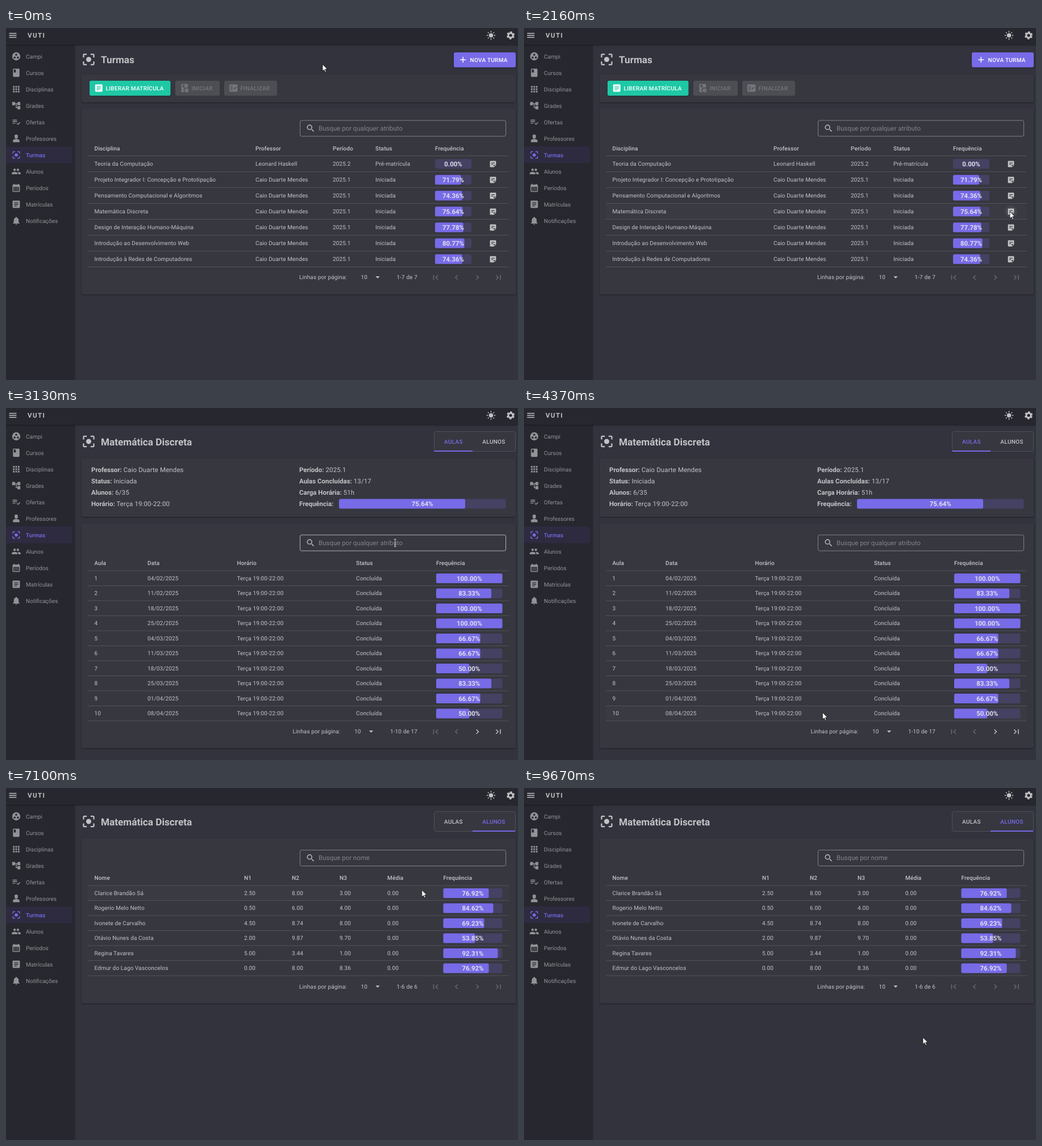
Write an HTML page that moves like this. It is 901 px wide and 621 px high and loops after 9.71 s.

```html
<!DOCTYPE html>
<html lang="pt-BR">
<head>
<meta charset="utf-8">
<title>Turmas</title>
<style>
  html, body { margin: 0; width: 100%; height: 100%; overflow: hidden; background: #32333d; }
  svg { display: block; }
  text { font-family: Roboto, sans-serif; letter-spacing: .0107em; text-rendering: geometricPrecision; fill: #c3c3c6; white-space: pre; }
  .plain { letter-spacing: 0; }
  .medium { font-weight: 500; }
  .bold { font-weight: 700; letter-spacing: 0; }
  .button { font-weight: 500; letter-spacing: .0286em; }
  .middle { text-anchor: middle; }
  .panel { fill: #373740; filter: drop-shadow(0 1px 1px #0006); }
  .raised { filter: drop-shadow(0 1px 1px #0006); }
  path { fill-rule: evenodd; }
  #cursor { pointer-events: none; }
</style>
</head>
<body>
<svg id="stage" width="901" height="621" viewBox="0 0 901 621"></svg>
<script>
const LOOP = 9710, OPEN_CLASS = 2200, OPEN_STUDENTS = 6450;
const PRIMARY = '#776be7', BRIGHT = '#c3c3c6', MUTED = '#939397', DISABLED = '#6b6b73';

const dot = (x, y, r) => `M${x - r} ${y}a${r} ${r} 0 1 0 ${2 * r} 0a${r} ${r} 0 1 0 ${-2 * r} 0z`;
const SHEET = 'M19 3H5c-1.1 0-2 .9-2 2v14c0 1.1.9 2 2 2h14c1.1 0 2-.9 2-2V5c0-1.1-.9-2-2-2z';
const grid = [4, 10, 16].flatMap(y => [4, 10, 16].map(x => `M${x} ${y}h4v4h-4z`)).join('');
const days = [12, 16].flatMap(y => [7, 11, 15].map(x => `M${x} ${y}h2v2h-2z`)).join('');
const icons = {
  menu: 'M3 6h18v2H3zM3 11h18v2H3zM3 16h18v2H3z',
  campus: dot(12, 12, 10) + dot(12, 8, 2.5) + dot(8, 15, 2.5) + dot(16, 15, 2.5),
  book: 'M18 2H6c-1.1 0-2 .9-2 2v16c0 1.1.9 2 2 2h12c1.1 0 2-.9 2-2V4c0-1.1-.9-2-2-2zM6 4h5v8l-2.5-1.5L6 12z',
  grid,
  tree: 'M22 11V3h-7v3H9V3H2v8h7V8h2v10h4v3h7v-8h-7v3h-2V8h2v3z',
  checklist: 'M3 10h11v2H3zM3 6h11v2H3zM3 14h7v2H3zM20.6 11.9l-4.3 4.3-2.1-2.1-1.4 1.4 3.5 3.5L22 13.3z',
  person: 'M8 4.5c0-3 8-3 8 0V8a4 4 0 0 1-8 0zM4 21v-4c0-2.7 5.3-4 8-4s8 1.3 8 4v4z',
  focus: dot(12, 12, 4) + 'M5 15H3v4c0 1.1.9 2 2 2h4v-2H5zM5 5h4V3H5c-1.1 0-2 .9-2 2v4h2zM19 3h-4v2h4v4h2V5c0-1.1-.9-2-2-2zM19 19h-4v2h4c1.1 0 2-.9 2-2v-4h-2z',
  people: dot(16, 8, 3) + dot(8, 8, 3) + 'M8 13c-2.3 0-7 1.2-7 3.5V19h14v-2.5c0-2.3-4.7-3.5-7-3.5zM16 13l-1 .1c1.2.8 2 1.9 2 3.4V19h6v-2.5c0-2.3-4.7-3.5-7-3.5z',
  calendar: 'M19 4h-1V2h-2v2H8V2H6v2H5c-1.1 0-2 .9-2 2v14c0 1.1.9 2 2 2h14c1.1 0 2-.9 2-2V6c0-1.1-.9-2-2-2zM19 20H5V10h14z' + days,
  article: SHEET + 'M14 17H7v-2h7zM17 13H7v-2h10zM17 9H7V7h10z',
  bell: 'M12 22c1.1 0 2-.9 2-2h-4c0 1.1.9 2 2 2zM18 16v-5c0-3.1-1.6-5.6-4.5-6.3V4a1.5 1.5 0 0 0-3 0v.7C7.6 5.4 6 7.9 6 11v5l-2 2v1h16v-1z',
  search: dot(9.5, 9.5, 6.5) + dot(9.5, 9.5, 4.5) + 'M14 15.2v.3l5 5 1.5-1.5-5-5h-.5z',
  note: 'M19 3H5c-1.1 0-2 .9-2 2v14c0 1.1.9 2 2 2h10l6-6V5c0-1.1-.9-2-2-2zM7 8h10v2H7zM12 14H7v-2h5zM14 19.5V14h5.5z',
  first: 'M18.4 16.6L13.8 12l4.6-4.6L17 6l-6 6 6 6zM6 6h2v12H6z',
  previous: 'M15.4 7.4L14 6l-6 6 6 6 1.4-1.4-4.6-4.6z',
  next: 'M10 6L8.6 7.4l4.6 4.6-4.6 4.6L10 18l6-6z',
  last: 'M5.6 7.4l4.6 4.6-4.6 4.6L7 18l6-6-6-6zM16 6h2v12h-2z',
  drop: 'M7 10l5 5 5-5z',
  plus: 'M19 13h-6v6h-2v-6H5v-2h6V5h2v6h6z',
  start: 'M4 4c0-1 1-2 2-2h12c1 0 2 1 2 2v7.5a6 6 0 0 0-8 10.5H6c-1 0-2-1-2-2zM7 4v7l2.5-1.5L12 11V4z' + dot(17, 17.5, 4.8) + 'M16.5 15v3l2.5 1.5.5-.8-2-1.2V15z',
  finish: 'M20 3H4c-1.1 0-2 .9-2 2v14c0 1.1.9 2 2 2h16c1.1 0 2-.9 2-2V5c0-1.1-.9-2-2-2zM10 17H5v-2h5zM10 13H5v-2h5zM10 9H5V7h5zM14.8 15L12 12.2l1.4-1.4 1.4 1.4L18 9l1.4 1.4z',
};

const at = (cx, cy, scale) => `transform="translate(${cx - 12 * scale} ${cy - 12 * scale}) scale(${scale})"`;
const icon = (name, cx, cy, color = BRIGHT, scale = .717) =>
  `<path d="${icons[name]}" ${at(cx, cy, scale)} fill="${color}"/>`;
const text = (x, cy, content, cls = '', size = 10.04, color = '') =>
  `<text x="${x}" y="${cy + size * .355}" class="${cls}" font-size="${size}" ${color && `style="fill:${color}"`}>${content}</text>`;
const box = (x, y, w, h, fill, r = 0, extra = '') =>
  `<rect x="${x}" y="${y}" width="${w}" height="${h}" rx="${r}" fill="${fill}" ${extra}/>`;
const panel = (y, bottom) => box(133, y, 764, bottom - y, '', 3, 'class="panel"');
const rule = y => box(144, y - .5, 741, 1, '#52525a');

const bar = (x, cy, w, value) => box(x, cy - 8.5, w, 17, '#444162', 2.5) +
  box(x, cy - 8.5, w * value / 100, 17, PRIMARY, 2.5) +
  text(x + w / 2, cy, value.toFixed(2) + '%', 'bold middle', 11.47, '#deddec');

const title = (cy, name) => icon('focus', 145.5, cy - .5, BRIGHT, 1.13) + text(167, cy, name, 'bold', 17.2);

const button = (x, y, w, name, label, fill, color) =>
  box(x, y, w, 26.5, fill, 3, color === '#fff' ? 'class="raised"' : '') +
  icon(name, x + 16.3, y + 13, color) + text(x + 28.5, y + 13.2, label, 'button', 10.04, color);

const search = (y, hint) =>
  box(517.5, y + .5, 362, 28, 'none', 3, 'class="field" stroke="#808087"') +
  icon('search', 536, y + 14.5) + text(550, y + 14.2, hint, 'plain', 11.47, '#838389');

// Columns hold the x of each heading; the last value of a row fills the bar.
const table = ({ top, step, columns, heads, rows, barWidth, note }) =>
  heads.map((h, i) => text(columns[i], top - 13.3, h, 'medium')).join('') + rule(top) +
  rows.map((row, r) => {
    const cy = top + step * (r + .5) - .3;
    return row.map((v, i) => i < row.length - 1 ? text(columns[i], cy, v) : bar(columns[i], cy + .6, barWidth, v)).join('') +
      (note ? icon('note', 857, cy + .8, BRIGHT, .6) : '') + rule(top + step * (r + 1));
  }).join('');

const pager = (cy, shift, range, more) =>
  text(516 - shift, cy, 'Linhas por página:') + text(624.5 - shift, cy, '10') +
  icon('drop', 654 - shift, cy) + text(687.5 - shift, cy, range) +
  ['first', 'previous', 'next', 'last'].map((n, i) =>
    icon(n, 756 + 36.8 * i, cy + .5, more && i > 1 ? BRIGHT : DISABLED)).join('');

const tabs = active => ['AULAS', 'ALUNOS'].map((label, i) =>
  text([787.5, 858.5][i], 59.3, label, 'button middle', 10.04, i === active ? PRIMARY : BRIGHT)).join('');

const teacher = 'Caio Duarte Mendes', hours = 'Terça 19:00-22:00';
const percent = (part, whole) => 100 * part / whole;

const classes = [
  ['Teoria da Computação', 'Leonard Haskell', '2025.2', 'Pré-matrícula', 0],
  ...[['Projeto Integrador I: Concepção e Prototipação', 71.79], ['Pensamento Computacional e Algoritmos', 74.36],
    ['Matemática Discreta', 75.64], ['Design de Interação Humano-Máquina', 77.78],
    ['Introdução ao Desenvolvimento Web', 80.77], ['Introdução à Redes de Computadores', 74.36],
  ].map(([name, value]) => [name, teacher, '2025.1', 'Iniciada', value]),
];
const lessons = [6, 5, 6, 6, 4, 4, 3, 5, 4, 3].map((present, i) => {
  const day = new Date(2025, 1, 4 + 7 * i), pad = n => String(n).padStart(2, '0');
  return [i + 1, `${pad(day.getDate())}/${pad(day.getMonth() + 1)}/2025`, hours, 'Concluída', percent(present, 6)];
});
const students = [
  ['Clarice Brandão Sá', 2.5, 8, 3, 10], ['Rogerio Melo Netto', .5, 6, 4, 11],
  ['Ivonete de Carvalho', 4.5, 8.74, 8, 9], ['Otávio Nunes da Costa', 2, 9.87, 9.7, 7],
  ['Regina Tavares', 5, 3.44, 1, 12], ['Edmur do Lago Vasconcelos', 0, 8, 8.36, 10],
].map(([name, a, b, c, present]) => [name, ...[a, b, c, 0].map(n => n.toFixed(2)), percent(present, 13)]);

const info = [
  [['Professor', teacher], ['Status', 'Iniciada'], ['Alunos', '6/35'], ['Horário', hours]],
  [['Período', '2025.1'], ['Aulas Concluídas', '13/17'], ['Carga Horária', '51h'], ['Frequência', '']],
].map((list, c) => list.map(([key, value], i) => text([150, 516][c], 109 + 20 * i,
  `<tspan class="bold">${key}:</tspan> ${value}`, '', 11.47)).join('')).join('');

const scenes = [
  { searchY: 162.5, top: 225.5, step: 28, rows: classes, columns: [155.5, 439, 575, 650, 755], barWidth: 64, note: true,
    heads: ['Disciplina', 'Professor', 'Período', 'Status', 'Frequência'], hint: 'Busque por qualquer atributo',
    panels: [[82, 131], [142, 470]],
    extra: title(56, 'Turmas') + button(788, 43, 109, 'plus', 'NOVA TURMA', PRIMARY, '#fff') +
      pager(439.5, 0, '1-7 de 7') },
  { searchY: 223.5, top: 287, step: 26.5, rows: lessons, columns: [155.5, 249, 406.5, 616, 757], barWidth: 116.5,
    heads: ['Aula', 'Data', 'Horário', 'Status', 'Frequência'], hint: 'Busque por qualquer atributo',
    panels: [[89, 192], [204, 600]],
    extra: title(59.5, 'Matemática Discreta') + tabs(0) + pager(570.5, 11.5, '1-10 de 17', true) },
  { searchY: 109, top: 172, step: 26.5, rows: students, columns: [155.5, 419, 503, 587, 671, 769.5], barWidth: 104,
    heads: ['Nome', 'N1', 'N2', 'N3', 'Média', 'Frequência'], hint: 'Busque por nome',
    panels: [[89, 380]],
    extra: title(59.5, 'Matemática Discreta') + tabs(1) + pager(350, 0, '1-6 de 6') },
];
const topPanels = [
  button(147, 93, 142.5, 'article', 'LIBERAR MATRÍCULA', '#1ec8a5', '#fff') +
    button(298, 93, 78, 'start', 'INICIAR', '#4d4d54', '#75757c') +
    button(384, 93, 93, 'finish', 'FINALIZAR', '#4d4d54', '#75757c'),
  info + bar(586, 169, 293.5, 75.64),
  '',
];

const menu = [['campus', 'Campi'], ['book', 'Cursos'], ['grid', 'Disciplinas'], ['tree', 'Grades'], ['checklist', 'Ofertas'],
  ['person', 'Professores'], ['focus', 'Turmas'], ['people', 'Alunos'], ['calendar', 'Períodos'],
  ['article', 'Matrículas'], ['bell', 'Notificações']];
const sidebar = box(0, 0, 121, 621, '#27272f', 0, 'class="raised"') + box(0, 209, 116, 29.5, '#2e2b40', 3) +
  menu.map(([name, label], i) => {
    const color = i === 6 ? PRIMARY : MUTED, cy = 50 + 29 * i;
    return icon(name, 18, cy, color) + text(35, cy, label, i === 6 ? 'plain medium' : 'plain', 10.04, color);
  }).join('');
const topbar = box(0, 0, 901, 29.5, '#27272f', 0, 'class="raised"') + icon('menu', 12, 13) +
  `<text x="38" y="17.2" font-size="11.5" class="medium" style="letter-spacing:1.4px;font-weight:700">VUTI</text>
  <g ${at(853.5, 13, .717)} fill="${BRIGHT}" stroke="${BRIGHT}" stroke-width="2" stroke-linecap="round"><circle cx="12" cy="12" r="4.2"/>
  <path d="M12 2v2M12 20v2M2 12h2M20 12h2M4.9 4.9l1.2 1.2M17.9 17.9l1.2 1.2M4.9 19.1l1.2-1.2M17.9 6.1l1.2-1.2"/></g>
  <g ${at(888, 13, .717)} fill="none" stroke="${BRIGHT}"><circle cx="12" cy="12" r="5.6" stroke-width="4"/>
  <circle cx="12" cy="12" r="8.5" stroke-width="2.6" stroke-dasharray="5 3.9"  transform="rotate(14 12 12)"/></g>`;

const stage = document.getElementById('stage');
stage.innerHTML = box(0, 0, 901, 621, '#32333d') + sidebar + topbar +
  `<g id="tabs">${box(753.5, 41.5, 143, 35, '#373740', 3, 'stroke="#505058"')}${box(821, 42, 75.5, 34, '#42424a', 0, 'id="tabHover"')}
  ${box(0, 75, 68, 2, PRIMARY, 0, 'id="slider"')}</g>` +
  scenes.map((s, i) => `<g class="scene">${s.panels.map(p => panel(...p)).join('')}
    ${box(144, 0, 741, s.step - 1, '#fff', 0, 'class="row" opacity=".015"')}
    ${i ? '' : '<circle id="noteHover" cx="857" cy="324" r="11" fill="#fff" opacity=".06"/>'}
    ${s.extra}${topPanels[i]}${search(s.searchY, s.hint)}${table(s)}</g>`).join('') +
  `<g id="cursor" stroke="#000" stroke-width=".7" fill="#fff">
  <path d="M0 0v12l2.8-2.6 1.9 4.3 1.9-.8-1.9-4.2h3.9z"/>
  <path d="M-1.2 1c0-1.5 2.4-1.5 2.4 0v4.5l4.4.9c1 .2 1.4.8 1.4 1.8 0 3-.8 4-1.4 8H-1.6C-2.5 13-4.5 11-4.8 9.5c0-1.5 2-1.3 3.6.8z"/>
  <path d="M-2-6.5h1.5l.5.5.5-.5H2M0-6V6M-2 6.5h1.5L0 6l.5.5H2" fill="none" stroke="#ddd" stroke-width="1"/></g>`;

const find = id => document.getElementById(id);
const groups = [...document.querySelectorAll('.scene')];
const show = (el, on) => { el.style.display = on ? '' : 'none'; };

// Pointer path: time, x, y
const path = [
  [0, 557, 64], [100, 557, 64], [600, 562, 270], [860, 568, 355], [1090, 573, 333], [1500, 715, 328], [1910, 855, 324],
  [2450, 855, 324], [2800, 760, 268], [3130, 685, 238], [3470, 620, 240], [3850, 565, 350], [4370, 525.5, 537], [4450, 524, 545],
  [4540, 524, 545], [5000, 640, 345], [5530, 792, 115], [5910, 855, 59], [6520, 855, 59], [6800, 800, 108], [7100, 732, 180],
  [7340, 700, 172], [7800, 665, 225], [8350, 621, 289], [8550, 633, 320], [9150, 633, 320], [9250, 638, 324],
  [9440, 638, 324], [9670, 702, 440], [LOOP, 702, 440],
];
const same = (a, b) => a[1] === b[1] && a[2] === b[2];
function slope(i, axis) {
  const before = path[i - 1], here = path[i], after = path[i + 1];
  if (!before || !after || same(before, here) || same(here, after)) return 0;
  return (after[axis] - before[axis]) / (after[0] - before[0]);
}
function pointer(t) {
  const i = Math.max(0, path.findIndex(p => p[0] > t) - 1), a = path[i], b = path[i + 1];
  const span = b[0] - a[0], u = (t - a[0]) / span, v = 1 - u;
  return [1, 2].map(k => a[k] * (1 + 2 * u) * v * v + b[k] * u * u * (3 - 2 * u) +
    span * (slope(i, k) * u * v * v - slope(i + 1, k) * u * u * v));
}

function draw(now) {
  const t = now % LOOP, [x, y] = pointer(t);
  const index = t < OPEN_CLASS ? 0 : t < OPEN_STUDENTS ? 1 : 2, scene = scenes[index], group = groups[index];
  groups.forEach((g, i) => show(g, i === index));
  show(find('tabs'), index > 0);

  const slide = 1 - (1 - Math.min(1, Math.max(0, (t - OPEN_STUDENTS) / 300))) ** 3;
  find('slider').setAttribute('x', 753.5 + 67.5 * slide);
  find('slider').setAttribute('width', 67.5 + 7.5 * slide);

  const row = Math.floor((y - scene.top) / scene.step), rowBox = group.querySelector('.row');
  show(rowBox, row >= 0 && row < scene.rows.length);
  rowBox.setAttribute('y', scene.top + row * scene.step + .5);
  show(find('noteHover'), Math.hypot(x - 857, y - 324) < 11);

  const inField = x > 517 && x < 880 && y > scene.searchY && y < scene.searchY + 29;
  group.querySelector('.field').setAttribute('stroke', inField ? '#b0b0b4' : '#808087');
  const inTab = index > 0 && x > 821 && x < 897 && y > 41 && y < 77;
  show(find('tabHover'), inTab);

  const overText = document.elementFromPoint(x, y)?.closest('text');
  const shape = inTab ? 1 : inField || overText ? 2 : 0;
  [...find('cursor').children].forEach((c, i) => show(c, i === shape));
  find('cursor').setAttribute('transform', `translate(${x} ${y})`);
}

const begin = performance.now();
(function tick() {
  draw(performance.now() - begin);
  requestAnimationFrame(tick);
})();
</script>
</body>
</html>
```
